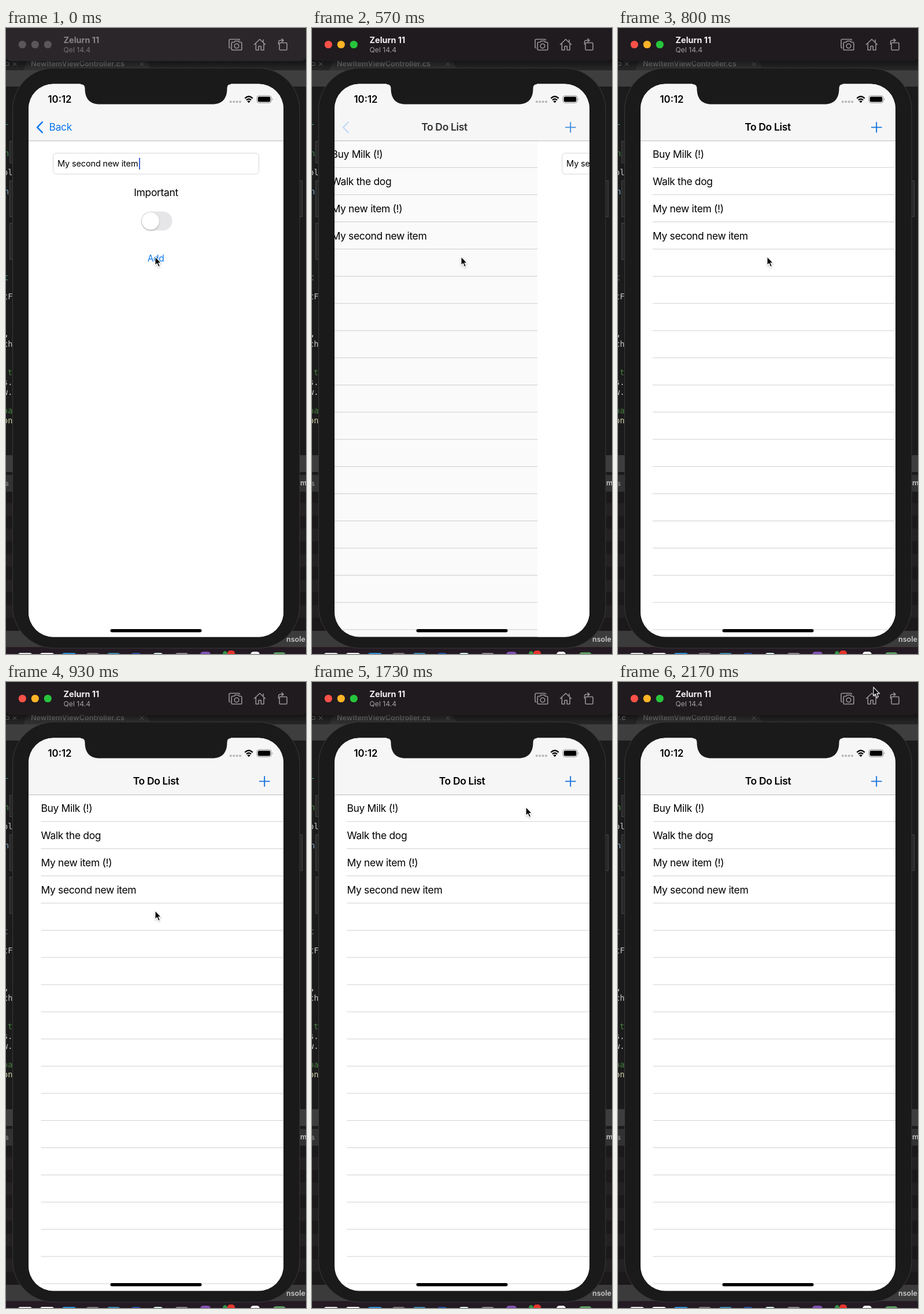
Write an HTML page that moves like this. It is 519 px wide and 1080 px high and loops after 2210 ms.

```html
<!DOCTYPE html>
<html lang="en">
<head>
<meta charset="utf-8">
<title>To Do List</title>
<style>
html, body { margin: 0; width: 100%; height: 100%; overflow: hidden; background: #1c1c1d; }
svg { display: block; width: 100vw; height: 100vh; font-family: Inter, sans-serif; }
.body { font-size: 17.5px; letter-spacing: -.36px; }
.bold { font-weight: 600; }
.mid { text-anchor: middle; }
.blue { fill: #0b78ee; }
.code { font: 13.5px "DejaVu Sans Mono", monospace; }
.tab { font-size: 12.6px; font-weight: 600; fill: #737373; }
.line { fill: none; stroke-linecap: round; stroke-linejoin: round; }
</style>
</head>
<body>
<svg viewBox="0 0 519 1080" preserveAspectRatio="none">
  <defs>
    <clipPath id="screen"><rect x="39" y="96.5" width="441" height="954" rx="43"/></clipPath>
    <linearGradient id="shade" x2="0" y2="1">
      <stop stop-opacity=".55"/><stop offset="1" stop-opacity="0"/>
    </linearGradient>
    <filter id="soft" x="-50%" y="-50%" width="200%" height="200%">
      <feDropShadow dx="0" dy="1.5" stdDeviation="1.5" flood-opacity=".25"/>
    </filter>
  </defs>

  <!-- Editor behind the phone -->
  <rect width="519" height="1080" fill="#1b1b1c"/>
  <rect y="54" width="519" height="19" fill="#252526"/>
  <path d="M30 73L38 54H242L251 73Z" fill="#303031"/>
  <rect y="73" width="519" height="28" fill="#3e3e3f"/>
  <g fill="#272728" stroke="#454546">
    <rect x="6.5" y="195.5" width="480" height="37"/>
    <rect x="6.5" y="263.5" width="506" height="62"/>
    <rect x="6.5" y="336.5" width="480" height="63"/>
  </g>
  <g id="code" class="code"></g>
  <rect y="737" width="519" height="29" fill="#3d3d3e"/>
  <rect y="771" width="519" height="29" fill="#323233"/>
  <rect y="800" width="519" height="240" fill="#1c191a"/>
  <path d="M0 830.5H519M0 874.5H519M0 918.5H519M0 962.5H519M0 1006.5H519" stroke="#242122" stroke-width="22"/>
  <rect y="1040" width="519" height="28" fill="#3b3b3c"/>
  <g font-size="12.5" font-weight="600" fill="#c8c8c8">
    <text x="-2" y="790" fill="#858585">s</text>
    <text x="509" y="789">m</text>
    <text x="485" y="1059">nsole</text>
  </g>
  <rect y="1068" width="519" height="12" fill="#241a23"/>
  <g id="dock"></g>

  <g class="tab">
    <text x="43" y="66">NewItemViewController.cs</text>
    <path class="line" d="M232 59l6 6m0-6l-6 6" stroke="#686868"/>
    <g id="tabClose" class="line" stroke="#777"><path d="M0 59.5h5v5h-5M12 59l6 6m0-6l-6 6"/></g>
    <text id="tabName" x="-2" y="66">r.c</text>
  </g>

  <!-- Phone -->
  <rect x="11.5" y="69" width="496.5" height="1001" rx="72" fill="#1a1a1a" stroke="#393939"/>
  <rect y="54" width="519" height="16" fill="url(#shade)"/>

  <g clip-path="url(#screen)">
    <rect x="39" y="96" width="441" height="955" fill="#fff"/>
    <g id="list" class="body">
      <g id="rows"></g>
    </g>
    <rect id="dim" x="39" y="96" width="441" height="955"/>
    <g id="detail">
      <rect x="39" y="195" width="441" height="856" fill="#fff"/>
      <rect x="81.5" y="216" width="356" height="36" rx="5.5" fill="#fff" stroke="#d5d5d6"/>
      <text x="89" y="239.3" font-size="14.6" letter-spacing="-.19">My second new item</text>
      <rect x="230" y="224" width="2" height="20" fill="#3e65d6"/>
      <text class="body mid" x="259.5" y="290.3">Important</text>
      <rect x="233.5" y="316.5" width="54" height="33" rx="16.5" fill="#e6e5e7"/>
      <circle cx="250" cy="333" r="14.8" fill="#fff" filter="url(#soft)"/>
      <text id="add" class="mid blue" x="259" y="403.3" font-size="15.6" letter-spacing="-.4">Add</text>
    </g>

    <rect x="39" y="96" width="441" height="98.5" fill="#f6f6f6"/>
    <path d="M39 194.7H480" stroke="#b9b9b9"/>
    <path id="chevron" class="line" d="M62.8 162.3L54 171.3L62.8 180.3" stroke="#0b78ee" stroke-width="2.5"/>
    <text id="back" class="body mid blue" x="94.3" y="177.3">Back</text>
    <text id="title" class="body bold mid" x="259.6" y="177.3">To Do List</text>
    <path id="plus" d="M438 171.4H456.5M447.2 162.2V180.6" stroke="#1272dc" stroke-width="1.9"/>

    <text class="bold" x="72.5" y="129.3" font-size="16.8">10:12</text>
    <g fill="#b8b8b9">
      <circle cx="388.8" cy="127.3" r="2"/><circle cx="394.2" cy="127.3" r="2"/>
      <circle cx="399.6" cy="127.3" r="2"/><circle cx="405" cy="127.3" r="2"/>
    </g>
    <path class="line" d="M413.3 121.3Q420 114.8 426.7 121.3M416 124.3Q420 120.6 424 124.3" stroke="#000" stroke-width="2.3" style="stroke-linecap:butt"/>
    <path d="M420 129.3L417.3 126.4Q420 124.3 422.7 126.4Z"/>
    <rect x="434" y="116.8" width="25" height="12.4" rx="3.6" fill="none" stroke="#909091"/>
    <rect x="435.7" y="118.5" width="21.6" height="9" rx="2.2"/>
    <path d="M460.4 121Q462.4 123 460.4 125Z" fill="#909091"/>
    <rect x="180.5" y="1037" width="158" height="5.5" rx="2.75"/>
  </g>
  <path d="M129 96H389V97Q382.5 97 382.5 104C382.5 122 374 131.5 357 131.5H162C145 131.5 136.5 122 136.5 104Q136.5 97 129 97Z" fill="#1a1a1a"/>

  <!-- Simulator title bar -->
  <path id="bar" d="M0 0H519V48Q519 57 510 57H9Q0 57 0 48Z"/>
  <g id="lights"></g>
  <text id="device" x="99.5" y="26.3" font-size="14.4" font-weight="700">Zelurn 11</text>
  <text id="system" x="99.5" y="42" font-size="12.2">Qel 14.4</text>
  <g class="line" stroke="#989396" stroke-width="1.6">
    <path d="M387.8 34.5Q386 34.5 386 32.5V21.5Q386 19.5 388 19.5H402.5Q404.3 19.5 404.3 21"/>
    <path d="M392 24.5H394.8L396.2 22.5H402L403.4 24.5H406Q407.8 24.5 407.8 26.3V36.2Q407.8 38 406 38H392Q390.2 38 390.2 36.2V26.3Q390.2 24.5 392 24.5Z"/>
    <circle cx="399" cy="31" r="3.8"/>
    <path d="M429.5 28.5L439 19.5L448.5 28.5M432.3 27V38H437V31.5H441.3V38H446V27M445 20.5V24"/>
    <rect x="473" y="25.5" width="13" height="12.5" rx="1.5"/>
    <path d="M471.5 28V24.5Q471.5 21.3 475 21.3H479.5M477 18.5L480 21.3L477 24"/>
  </g>

  <g id="cursor">
    <path d="M0 0V15L3.4 11.8L5.8 17.6L8.4 16.5L6 10.9H10.4Z" stroke="#fff" stroke-width="1.1" filter="url(#soft)"/>
  </g>
</svg>

<script>
const LOOP = 2210, FRAME = 1000 / 30;
const ACTIVATE = 30, PRESS = 70, POP = 530, POP_ORIGIN = 472, TAB_SWAP = 2000;
const SCREEN_WIDTH = 441, ROW = 46.9;

const $ = id => document.getElementById(id);
const set = (id, attrs) => {
  for (const name in attrs) $(id).setAttribute(name, attrs[name]);
};
const shift = (id, x, y = 0) => set(id, { transform: `translate(${x} ${y})` });
const clamp = v => Math.min(1, Math.max(0, v));

// Code that peeks out beside the phone: text, x, baseline, colour
$('code').innerHTML = [
  ['–', -5, 170, '#3fae95'], ['n', -3, 221, '#4a9b48'], ['ol', -5, 254, '#c9c9c9'],
  ['n', -3, 287, '#8bb4d5'], ['t', -4, 435, '#3fae95'], ['tF', -5, 468, '#c9c9c9'],
  [',', -3, 532, '#c9c9c9'], ['ch', -5, 550, '#c9c9c9'], ['t', 3, 599, '#47833f'],
  ['s.', -5, 616, '#c9c9c9'], ['w.', -5, 633, '#c9c9c9'], ['oa', -5, 665, '#47833f'],
  ['on', -5, 682, '#d6d6b0']
].map(([text, x, y, fill]) => `<text x="${x}" y="${y}" fill="${fill}">${text}</text>`).join('');
const keyword = $('code').children[4];

// Tops of the dock tiles: x, width, colour, y
$('dock').innerHTML = [
  [20, 26, '#e4e4e6'], [58, 26, '#f2f2f2'], [96, 26, '#2d8fd5'], [138, 24, '#77777a'],
  [174, 24, '#3b87ac'], [216, 18, '#2450a4'], [254, 18, '#d5eee8'], [292, 24, '#85858a'],
  [336, 18, '#8150b3', 1076], [375, 8, '#339447', 1075], [383, 13, '#e6352d', 1074],
  [423, 16, '#f1f1f1', 1076], [462, 22, '#5d9c63', 1077]
].map(([x, w, fill, y = 1078]) =>
  `<rect x="${x}" y="${y}" width="${w}" height="16" rx="5" fill="${fill}"/>`).join('');

const items = ['Buy Milk (!)', 'Walk the dog', 'My new item (!)', 'My second new item'];
$('rows').innerHTML =
  items.map((item, i) => `<text x="60.5" y="${224.3 + i * ROW}">${item}</text>`).join('') +
  Array.from({ length: 18 }, (_, i) =>
    `<path d="M60.5 ${240.7 + i * ROW}H480" stroke="#d0d0d1"/>`).join('');

const lightColors = ['#fa5148', '#fdb426', '#27c53c'];
$('lights').innerHTML = lightColors.map((_, i) =>
  `<circle cx="${28.3 + i * 22}" cy="28.5" r="6.6"/>`).join('');

function drawTitleBar(active) {
  set('bar', { fill: active ? '#201b1f' : '#2b2629' });
  set('device', { fill: active ? '#f4f3f4' : '#898487' });
  set('system', { fill: active ? '#a39fa2' : '#777275' });
  [...$('lights').children].forEach((light, i) =>
    light.setAttribute('fill', active ? lightColors[i] : '#5b5659'));
  keyword.setAttribute('fill', active ? '#6b7572' : '#3fae95');
}

function drawPages(t) {
  const left = t < POP ? 1 : Math.exp(-(t - POP_ORIGIN) * 0.0168);
  const done = 1 - left;
  shift('detail', SCREEN_WIDTH * done);
  shift('list', -0.3 * SCREEN_WIDTH * left);
  shift('title', -150 * left);
  shift('back', 165 * done);
  set('dim', { opacity: 0.1 * left });
  set('chevron', { opacity: left });
  set('back', { opacity: left * left });
  set('title', { opacity: done });
  set('plus', { opacity: done });
  set('add', { opacity: t < PRESS ? 1 : 0.2 });
}

function drawCursor(t) {
  const u = clamp((t - 1400) / 700);
  const s = u * u * (3 - 2 * u);
  const curve = (a, b, c) => (1 - s) ** 2 * a + 2 * s * (1 - s) * b + s * s * c;
  shift('cursor', curve(258, 403.5, 442), curve(394.5, 202, 9));
}

function draw(now) {
  const t = Math.floor((now % LOOP + 3.34) / FRAME) * FRAME;
  drawTitleBar(t >= ACTIVATE);
  drawPages(t);
  drawCursor(t);
  set('tabClose', { opacity: t < TAB_SWAP ? 1 : 0 });
  set('tabName', { opacity: t < TAB_SWAP ? 0 : 1 });
}

const start = performance.now();
function tick() {
  draw(performance.now() - start);
  requestAnimationFrame(tick);
}
tick();
</script>
</body>
</html>
```
